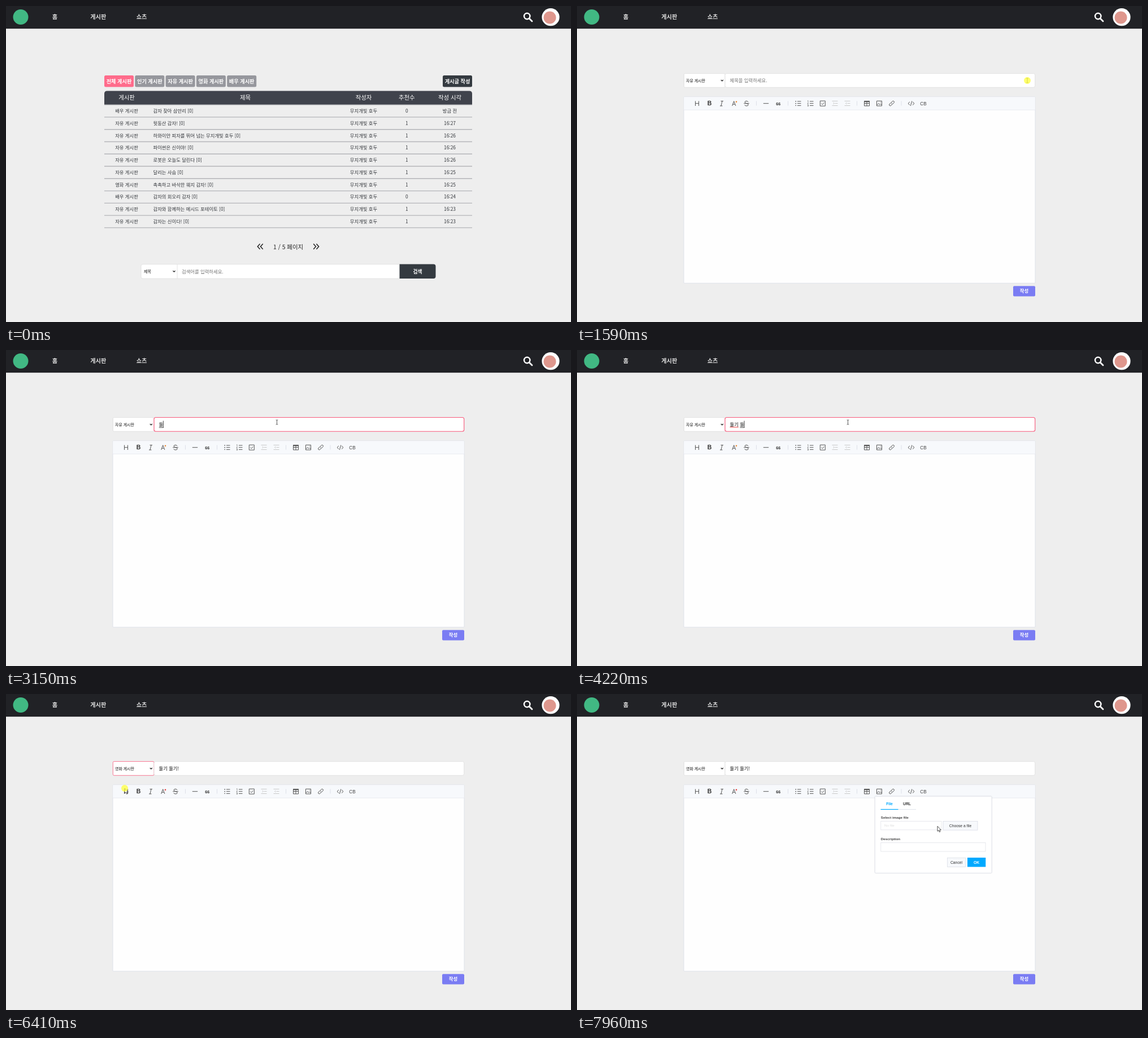
An HTML page for the animation above (7990 ms loop, 1000 by 560 pixels).

```html
<!DOCTYPE html>
<html lang="ko">
<head>
<meta charset="utf-8">
<title>게시판</title>
<style>
  html, body { margin: 0; width: 100%; height: 100%; overflow: hidden; background: #eee; }
  svg { display: block; width: 100%; height: 100%; }
  text { font-family: "Noto Sans CJK KR", "Noto Sans CJK", "Noto Sans", sans-serif; white-space: pre; }
  .latin text { font-family: "Liberation Sans", Arial, sans-serif; }
</style>
</head>
<body>
<svg id="stage" viewBox="0 0 1000 560"></svg>
<script>
const LOOP = 7990;
const stage = document.getElementById('stage');

// Markup helpers
const rect = (x, y, right, bottom, fill, rx = 0, extra = '') =>
  `<rect x="${x}" y="${y}" width="${right - x}" height="${bottom - y}" rx="${rx}" fill="${fill}" ${extra}/>`;
const label = (x, y, str, size = 8.33, fill = '#33363b', weight = 400, anchor = 'start', extra = '') =>
  `<text x="${x}" y="${y}" font-size="${size}" fill="${fill}" font-weight="${weight}" text-anchor="${anchor}" ${extra}>${str}</text>`;
const centered = (x, y, str, size, fill, weight) => label(x, y, str, size, fill, weight, 'middle');
const path = (d, stroke = '#555', width = 1, extra = '') =>
  `<path d="${d}" fill="none" stroke="${stroke}" stroke-width="${width}" ${extra}/>`;
const group = (id, content, extra = '') => `<g id="${id}" ${extra}>${content}</g>`;
const outline = color => `stroke="${color}" stroke-width=".8"`;
const shadow = (y, blur, color) => ` style="filter:drop-shadow(0 ${y}px ${blur}px ${color})"`;
const chevron = (x, y) => path(`M${x - 2} ${y - 1}l2 2l2 -2`, '#111', 1.2);

const header = () =>
  rect(0, 0, 1000, 40.2, '#212226') +
  '<circle cx="26" cy="19.5" r="13.5" fill="#41b883"/>' +
  [[86.5, '홈'], [163.3, '게시판'], [240, '쇼츠']]
    .map(([x, s]) => centered(x, 23.4, s, 10.2, '#dcdcdc', 700)).join('') +
  '<circle cx="922.2" cy="18" r="5.2" fill="none" stroke="#fff" stroke-width="2.5"/>' +
  path('M926 22l5 5', '#fff', 2.8, 'stroke-linecap="round"') +
  '<circle cx="964" cy="19.7" r="15.6" fill="#fff"/>' +
  '<ellipse cx="962.5" cy="20.5" rx="11" ry="11" fill="#df978d"/>';

const POSTS = [
  ['배우', '감자 찾아 삼만리', 0, '방금 전'],
  ['자유', '뒷동산 감자!', 1, '16:27'],
  ['자유', '하와이안 피자를 뛰어 넘는 무지개빛 호두', 1, '16:26'],
  ['자유', '파이썬은 신이야!', 1, '16:26'],
  ['자유', '로봇은 오늘도 달린다', 1, '16:26'],
  ['자유', '달리는 사슴', 1, '16:25'],
  ['영화', '촉촉하고 바삭한 웨지 감자!', 1, '16:25'],
  ['배우', '감자의 회오리 감자', 0, '16:24'],
  ['자유', '감자와 함께하는 메시드 포테이토', 1, '16:23'],
  ['자유', '감자는 신이다!', 1, '16:23']
];
const COLUMNS = [[213.5, '게시판'], [423.5, '제목'], [633, '작성자'], [709.3, '추천수'], [785.5, '작성 시각']];

function boardPage() {
  const tabs = ['전체', '인기', '자유', '영화', '배우'].map((name, i) => {
    const x = 174 + i * 54.3;
    return rect(x, 123, x + 52, 143.5, i ? '#96979d' : '#ff6b8b', 2.5) +
      centered(x + 26, 136.6, name + ' 게시판', 9.17, '#fff', 700);
  }).join('');
  const rows = POSTS.map(([board, title, likes, time], i) => {
    const y = 189 + i * 21.78, line = 196.9 + i * 21.78;
    return centered(213.5, y, board + ' 게시판') + label(260.5, y, title + ' [0]') +
      centered(633, y, '무지개빛 호두') + centered(709.3, y, likes) + centered(785.5, y, time) +
      path(`M174 ${line}H825`, '#b4b5b9', 1.4);
  }).join('');
  return tabs +
    rect(773, 123, 825, 143.5, '#343a40', 2.5) + centered(799, 136.6, '게시글 작성', 9.17, '#fff', 700) +
    '<path d="M174 175V155.5q0-5 5-5H820q5 0 5 5V175Z" fill="#40434c"/>' +
    path('M174 175.1H825', '#b4b5b9', 1.4) +
    COLUMNS.map(([x, s]) => centered(x, 165.8, s, 10.42, '#fff', 500)).join('') + rows +
    path('M449.5 421.5l-4.2 4.7l4.2 4.7M454.7 421.5l-4.2 4.7l4.2 4.7', '#222', 1.5) +
    path('M544.2 421.5l4.2 4.7l-4.2 4.7M549.4 421.5l4.2 4.7l-4.2 4.7', '#222', 1.5) +
    centered(499.5, 430.5, '1 / 5 페이지', 10.42, '#222') +
    rect(239, 457.7, 700, 483, '#fff', 3, outline('#ddd')) + path('M303 458V483', '#ddd', .8) +
    label(244, 473, '제목', 6.94, '#111') + chevron(297.5, 470.2) +
    label(311, 473.6, '검색어를 입력하세요.', 8.33, '#757575') +
    '<path d="M696.5 457.5H756.5q4 0 4 4V479q0 4-4 4H696.5Z" fill="#343a40"/>' +
    centered(728.5, 473.7, '검색', 8.7, '#fff', 700);
}

function toolbar() {
  const light = '#c9c9c9';
  const lines = x => path(`M${x} 169h6.5M${x} 172.7h6.5M${x} 176.4h6.5`);
  const indent = (x, tip) => path(`M${x - 5} 168.5h10M${x} 172.5h5M${x - 5} 176.5h10M${x - 2 - tip} 171l${tip * 2} 1.5l${-tip * 2} 1.5`, light);
  return path('M317.5 168.5v8M373.5 168.5v8M495.5 168.5v8M574 168.5v8', '#dde0e8') +
    path('M209.5 168.5v8.5M215.5 168.5v8.5M209.5 172.7h6') +
    '<g class="latin">' + centered(234.6, 176.4, 'B', 10.5, '#333', 700) + centered(613, 176, 'CB', 8.2, '#444') + centered(356.2, 176, '66', 7.2, '#333', 700) + '</g>' +
    path('M254.5 168.5h4.5M253 177h4.5M257 168.5l-2 8.5') +
    path('M274.7 177l3-8.3l3.2 8.3M275.8 174.2h4') +
    '<circle id="colorDot" cx="282" cy="169.8" r="1.3"/>' +
    path('M303 170.2q-.8-1.8-3-1.8q-3 0-3 2q0 1.4 3 2.1q3.2.8 3.2 2.4q0 2.2-3.2 2.2q-2.6 0-3.2-2M295.2 172.7h9.6') +
    path('M329.8 172.7h9.4') +
    lines(390) + path('M386.5 169h1.5M386.5 172.7h1.5M386.5 176.4h1.5', '#555', 1.4) +
    lines(412) + path('M408 168.2l1-.6v3M407.8 172h1.7l-1.7 1.7h1.8M407.8 175.3h1.7v2.3h-1.7M408.3 176.4h1.2', '#555', .6) +
    path('M430.3 168.2h9v9h-9ZM432.3 172.6l2 2l3.3-3.5') +
    indent(456.5, 1) + indent(478.5, -1) +
    path('M508.5 168.5h9v8.5h-9ZM508.5 172.5h9M513 169v8') + path('M508.2 169.2h9.6', '#555', 2) +
    path('M530.5 168.3h9v8.7h-9ZM531 175.5l2.7-2.8l2 2l1.5-1.3l2 2M536.7 170.5h1') +
    path('M556.5 170.5l1.7-1.7q1.5-1 2.8.2q1 1.3 0 2.5l-2.3 2.2q-1.3.8-2.4-.2M557.5 174.8l-1.7 1.7q-1.5 1-2.8-.2q-1-1.3 0-2.5l2.3-2.2q1.3-.8 2.4.2') +
    path('M589 169.8l-3 2.9l3 2.9M594 169.8l3 2.9l-3 2.9M592.7 168.5l-2.3 8.5');
}

const popup = () =>
  rect(527.3, 181.3, 734, 317.3, '#fff', 1.5, outline('#dadde6') + shadow(.8, .8, '#0001')) +
  centered(553, 196.7, 'File', 6.77, '#00a9ff', 700) + centered(584, 196.7, 'URL', 6.77, '#333', 700) +
  path('M568 204.5H600', '#dadde6', .8) + path('M537.5 204.5H568.5', '#00a9ff', 1.2) +
  label(537.8, 220.7, 'Select image file', 6.25, '#444', 700) +
  rect(537.8, 225.4, 645, 240.8, '#fff', 0, outline('#e1e3e9')) + label(544, 235.4, 'No file', 6.25, '#ddd') +
  rect(648, 225.4, 709, 241.2, '#f7f9fc', 0, outline('#dadde6')) + centered(678.5, 236, 'Choose a file', 6.77, '#333') +
  label(537.8, 258.8, 'Description', 6.25, '#444', 700) +
  rect(537.8, 263.4, 723, 279, '#fff', 0, outline('#e1e3e9')) +
  rect(655.6, 290.3, 687.8, 306.3, '#f7f9fc', 0, outline('#dadde6')) + centered(671.5, 300.8, 'Cancel', 6.77, '#333') +
  rect(691, 290, 723.3, 306.4, '#00a9ff') + centered(707, 300.8, 'OK', 6.77, '#fff', 700);

const dropdown = () =>
  rect(189, 145, 262, 190.5, '#fff', 0, outline('#aaa') + shadow(.5, 2, '#0004')) +
  rect(189.4, 0, 261.6, 15, '#1967d2', 0, 'id="option"') +
  ['자유', '영화', '배우'].map((s, i) => label(193, 155.2 + i * 15, s + ' 게시판', 6.94, '#111', 400, 'start', 'class="choice"')).join('');

const writePage = () =>
  rect(189.3, 119.5, 262, 144.3, '#fff', 2, 'id="select" stroke-width=".8"') +
  label(193, 134.6, '', 6.94, '#111', 400, 'start', 'id="board"') + chevron(256.8, 131.8) +
  rect(262, 119.5, 810.7, 144.3, '#fff', 3, 'id="field"') +
  label(270.5, 135, '제목을 입력하세요.', 8.33, '#757575', 400, 'start', 'id="hint"') +
  label(270.5, 135, '', 8.33, '#111', 400, 'start', 'id="title"') +
  path('M270.5 136.8h15.3', '#e33', .9, 'id="spelling"') +
  path('', '#111', .7, 'id="composing"') +
  rect(189, 161, 811, 491.2, '#fefefe', 1, outline('#dadde6')) +
  rect(189.4, 161.4, 810.6, 184, '#f7f9fc') + path('M189 184.2H811', '#e6e8ef', .8) + toolbar() +
  rect(772, 496.3, 811, 514.5, '#7a7cf3', 2) + centered(791.5, 508.4, '작성', 8.33, '#fff', 700) +
  path('', '#111', .8, 'id="caret"') +
  group('dropdown', dropdown()) + group('popup', popup(), 'class="latin"');

stage.innerHTML = rect(0, 0, 1000, 560, '#eee') + header() +
  group('boardPage', boardPage()) + group('writePage', writePage()) +
  group('pointer',
    '<path id="arrow" d="M0 0V9L2 7.2L3.5 10.3L5 9.6L3.6 6.6H6.3Z" fill="#fff" stroke="#222" stroke-width=".8"/>' +
    '<path id="hand" d="M-1 0q1-1 1.7 0V4L5 5q1 .3 .8 1.5L5 10H0L-3 6q0-1.2 2 0Z" fill="#fff" stroke="#222" stroke-width=".7"/>' +
    path('M-1.8 -4H-.4L0 -3.6L.4 -4H1.8M0 -3.6V3.6M-1.8 4H-.4L0 3.6L.4 4H1.8', '#333', .8, 'id="beam"') +
    '<circle id="click" r="6" fill="#ffff3c" fill-opacity=".75"/>');

const el = Object.fromEntries([...stage.querySelectorAll('[id]')].map(e => [e.id, e]));
const choices = [...stage.querySelectorAll('.choice')];
const show = (node, on) => { node.style.display = on ? '' : 'none'; };
const within = (t, from, to) => t >= from && t < to;

// Timeline: [time, value...]
const ROUTE = [
  [110, 629, 537], [300, 672, 400], [500, 748, 185], [640, 783, 81], [900, 786, 91],
  [1220, 787, 108], [1390, 797, 132], [1660, 797, 132], [2050, 481, 128], [2300, 479.5, 128],
  [5340, 479.5, 128], [5570, 325, 82], [5750, 208, 110], [5880, 206, 131], [6020, 206, 131],
  [6220, 210, 167], [6440, 210, 167], [6850, 369, 252], [6980, 369, 252],
  [7100, 517, 223], [7240, 533, 175], [7780, 533, 175], [7960, 638, 234.3]
];
const TYPED = [
  [2060, '', 0], [2410, 'ㄷ', 1], [3050, '두', 1], [3150, '둘', 1], [3350, '둘ㄱ', 1], [3450, '둘기', 1],
  [3720, '둘기 ', 0], [3890, '둘기 ㄷ', 1], [4020, '둘기 두', 1], [4220, '둘기 둘', 1],
  [4450, '둘기 둘ㄱ', 1], [4580, '둘기 둘기', 1], [4920, '둘기 둘기!', 0]
];
const OPENED = 1560, FOCUSED = 2060, BLURRED = 5960, CHOSEN = 6390, EDITING = 6975, POPUP = 7480;
const CLICKS = [OPENED, FOCUSED, BLURRED, CHOSEN, EDITING, POPUP];

// Smooth curve through the route; the pointer rests at both ends of a pause.
function pointerAt(t) {
  const next = ROUTE.findIndex(k => k[0] > t);
  if (next < 1) return ROUTE.at(next).slice(1);
  const [a, b] = [ROUTE[next - 1], ROUTE[next]];
  const span = b[0] - a[0], p = (t - a[0]) / span;
  const still = (j, k) => !ROUTE[j] || !ROUTE[k] || Math.hypot(ROUTE[j][1] - ROUTE[k][1], ROUTE[j][2] - ROUTE[k][2]) < 3;
  const speed = (k, i) => still(k - 1, k) || still(k, k + 1) ? 0
    : (ROUTE[k + 1][i] - ROUTE[k - 1][i]) / (ROUTE[k + 1][0] - ROUTE[k - 1][0]);
  return [1, 2].map(i => {
    const move = b[i] - a[i], from = speed(next - 1, i) * span, to = speed(next, i) * span;
    return a[i] + p * (from + p * (3 * move - 2 * from - to + p * (from + to - 2 * move)));
  });
}

function drawPointer(t) {
  const [x, y] = pointerAt(t);
  show(el.pointer, t >= 110);
  el.pointer.setAttribute('transform', `translate(${x} ${y})`);
  const over = (l, top, r, bottom) => within(x, l, r) && within(y, top, bottom);
  const writing = t >= OPENED;
  const beam = writing && (over(262, 119, 811, 145) || (over(189, 184, 811, 491) && within(t, CHOSEN, POPUP)));
  const hand = writing ? within(t, EDITING, POPUP) && over(189, 161, 811, 184) : over(773, 123, 825, 144);
  show(el.beam, beam);
  show(el.hand, hand);
  show(el.arrow, !beam && !hand);
  show(el.click, CLICKS.some(c => within(t, c - 30, c + 90)));
}

function drawTitle(t) {
  const [since, str, composing] = TYPED.findLast(k => k[0] <= t) || [0, '', 0];
  const focused = within(t, FOCUSED, BLURRED);
  el.title.textContent = str;
  const end = 270.5 + (str ? el.title.getComputedTextLength() : 0);
  show(el.hint, !str);
  show(el.spelling, within(t, 3720, BLURRED));
  show(el.composing, composing);
  el.composing.setAttribute('d', `M${end - 7.4} 137.5H${end}`);
  el.field.setAttribute('stroke', focused ? '#f8587a' : '#ddd');
  el.field.setAttribute('stroke-width', focused ? 1.1 : .8);

  const editing = within(t, EDITING, POPUP);
  const blink = (t - (editing ? EDITING : since)) % 1060 < 530;
  show(el.caret, blink && (focused || editing));
  el.caret.setAttribute('d', editing ? 'M202 194.5v8.5' : `M${end + .2} 125.5v12.5`);
}

function draw(t) {
  show(el.boardPage, t < OPENED);
  show(el.writePage, t >= OPENED);
  drawTitle(t);
  el.board.textContent = (t < CHOSEN ? '자유' : '영화') + ' 게시판';
  el.select.setAttribute('stroke', within(t, BLURRED, EDITING) ? '#f8587a' : '#ddd');
  el.colorDot.setAttribute('fill', t < CHOSEN ? '#e8862e' : '#e83a3a');
  const picked = t < 6160 ? 0 : 1;
  show(el.dropdown, within(t, BLURRED, CHOSEN));
  el.option.setAttribute('y', 145.4 + picked * 15);
  choices.forEach((c, i) => c.setAttribute('fill', i === picked ? '#fff' : '#111'));
  show(el.popup, t >= POPUP);
  drawPointer(t);
}

const start = performance.now();
function tick() {
  draw((performance.now() - start) % LOOP);
  requestAnimationFrame(tick);
}
tick();
</script>
</body>
</html>
```
